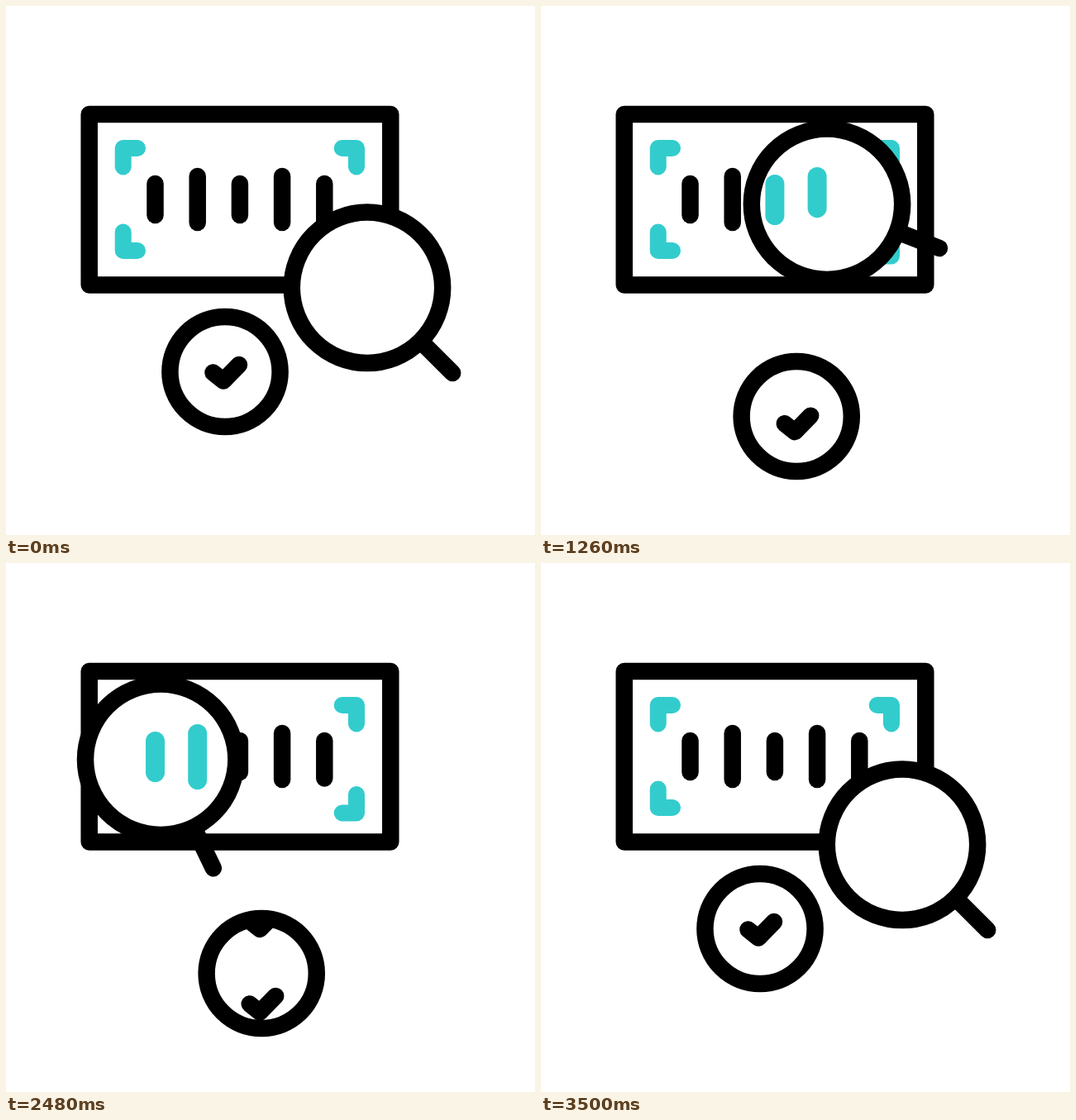
Animation, 640 px wide and 640 px high, one loop 3.56 s. Source, as an HTML page with a canvas:

```html
<!DOCTYPE html>
<html lang="en">
<head>
<meta charset="utf-8">
<title>Scan and verify</title>
<style>
html, body { margin: 0; width: 100%; height: 100%; overflow: hidden; background: #fff; }
canvas { display: block; }
</style>
</head>
<body>
<canvas id="stage" width="640" height="640"></canvas>
<script>
const ctx = document.getElementById('stage').getContext('2d');
const LOOP = 3560, TEAL = '#33cccd', BLACK = '#000', LINE = 20.5;
const RAD = Math.PI / 180, SCAN_START = 580, SCAN_END = 1420;

const clamp = v => Math.max(0, Math.min(1, v));
const mix = (a, b, p) => a + (b - a) * p;
const smooth = p => p * p * (3 - 2 * p);
const speedUp = p => p ** 1.2;
const slowDown = p => 1 - (1 - p) ** 2.2;
const span = (t, from, to) => clamp((t - from) / (to - from));
const ease = (t, from, to, curve = smooth) => curve(span(t, from, to));

function line(points, color = BLACK, width = LINE) {
  ctx.beginPath();
  points.forEach(([x, y]) => ctx.lineTo(x, y));
  ctx.strokeStyle = color;
  ctx.lineWidth = width;
  ctx.stroke();
}

// White disc with a black rim; its content is clipped to the inside.
function dial(x, y, r, drawContent) {
  const outline = new Path2D();
  outline.arc(x, y, r, 0, 7);
  ctx.fillStyle = '#fff';
  ctx.fill(outline);
  ctx.save();
  ctx.clip(outline);
  drawContent();
  ctx.restore();
  ctx.strokeStyle = BLACK;
  ctx.lineWidth = LINE;
  ctx.stroke(outline);
}

// Part of a polyline between two fractions of its length.
function trim(points, from, to) {
  const stops = [0];
  for (let i = 1; i < points.length; i++) {
    const [[ax, ay], [bx, by]] = [points[i - 1], points[i]];
    stops.push(stops[i - 1] + Math.hypot(bx - ax, by - ay));
  }
  const total = stops.at(-1);
  const at = d => {
    const i = Math.max(1, stops.findIndex(s => s >= d));
    const p = span(d, stops[i - 1], stops[i]);
    return points[i].map((v, k) => mix(points[i - 1][k], v, p));
  };
  const inner = points.filter((_, i) => stops[i] > from * total && stops[i] < to * total);
  return [at(from * total), ...inner, at(to * total)];
}

const bars = [253, 262, 253, 262, 260.5].map((bottom, i) =>
  ({ x: 180.5 + 51.2 * i, top: i % 2 ? 206 : 215, bottom }));

function corner(x, y, dx, dy) {
  line([[x, y + 22.5 * dy], [x, y], [x + 17.3 * dx, y]], TEAL, 20);
}

function drawTicket() {
  ctx.strokeStyle = BLACK;
  ctx.lineWidth = LINE;
  ctx.strokeRect(100.7, 131, 364.6, 206.5);
  corner(141.7, 172, 1, 1);
  corner(424, 172, -1, 1);
  corner(141.7, 296, 1, -1);
  corner(424, 302.5, -1, -1);
  bars.forEach(({ x, top, bottom }) => line([[x, top], [x, bottom]]));
}

function lensPosition(t) {
  const out = ease(t, 100, SCAN_START);
  const scan = ease(t, SCAN_START, SCAN_END, speedUp);
  const back = ease(t, SCAN_END, 2420, slowDown);
  const home = ease(t, 2420, 3340);
  return [
    437 - 311 * out + 283 * scan - 225 * back + 253 * home,
    340.8 - 101.8 * out + scan - 3.5 * back + 104.3 * home
  ];
}

function drawLens(t) {
  const [x, y] = lensPosition(t);
  const [scanX] = lensPosition(Math.min(t, SCAN_END));
  dial(x, y, 91.2, () => {
    if (t < SCAN_START) return;
    for (const bar of bars) {
      const shown = clamp((scanX - bar.x + 14) / 38);
      if (shown) line([[bar.x, bar.top + .5], [bar.x, mix(bar.top, bar.bottom, shown) + .5]], TEAL, 23);
    }
  });

  const turn = 45 - 11.8 * ease(t, 100, SCAN_START) - 14.2 * ease(t, SCAN_START, 1500)
    + 45.2 * ease(t, 1500, 2500) - 19.2 * ease(t, 2500, 3360);
  const onHandle = r => [x + r * Math.cos(turn * RAD), y + r * Math.sin(turn * RAD)];
  line([onHandle(95), onHandle(146)]);
}

function drawBadge(t) {
  const away = ease(t, 100, 720) - ease(t, 3200, 3500);
  const x = mix(265, 309.2, away), y = mix(442.5, 496.5, away);
  const pitch = 100.5;
  const fall = pitch * (ease(t, 1060, 2250) + ease(t, 2180, 2925)) % pitch;
  const tick = dy => [[x - 14.5, y + dy + 1], [x - 2, y + dy + 11], [x + 17, y + dy - 8.5]];
  dial(x, y, 66.6, () => {
    line(tick(fall));
    line(tick(fall - pitch));
    const end = span(t, 2760, 2915), start = span(t, 3000, 3140);
    if (end > start) line(trim(tick(0), start, end), TEAL, 23);
  });
}

// A fan of three rays; the middle one is longer and leads.
function drawRays(t) {
  for (const side of [-1, 0, 1]) {
    const angle = (219 + 39 * side) * RAD;
    const [inner, length, delay] = side ? [70, 12, 40] : [57, 29, 0];
    const end = ease(t - delay, 2740, 2920), start = ease(t - delay, 2840, 3060);
    const point = p => {
      const r = inner + length * p;
      return [288 + r * Math.cos(angle), 456.5 + r * Math.sin(angle)];
    };
    if (end > start) line([point(start), point(end)], TEAL, 20);
  }
}

function frame(now) {
  const t = now % LOOP;
  ctx.fillStyle = '#fff';
  ctx.fillRect(0, 0, 640, 640);
  ctx.lineCap = ctx.lineJoin = 'round';
  drawTicket();
  drawLens(t);
  drawBadge(t);
  drawRays(t);
  requestAnimationFrame(frame);
}
requestAnimationFrame(frame);
</script>
</body>
</html>
```
